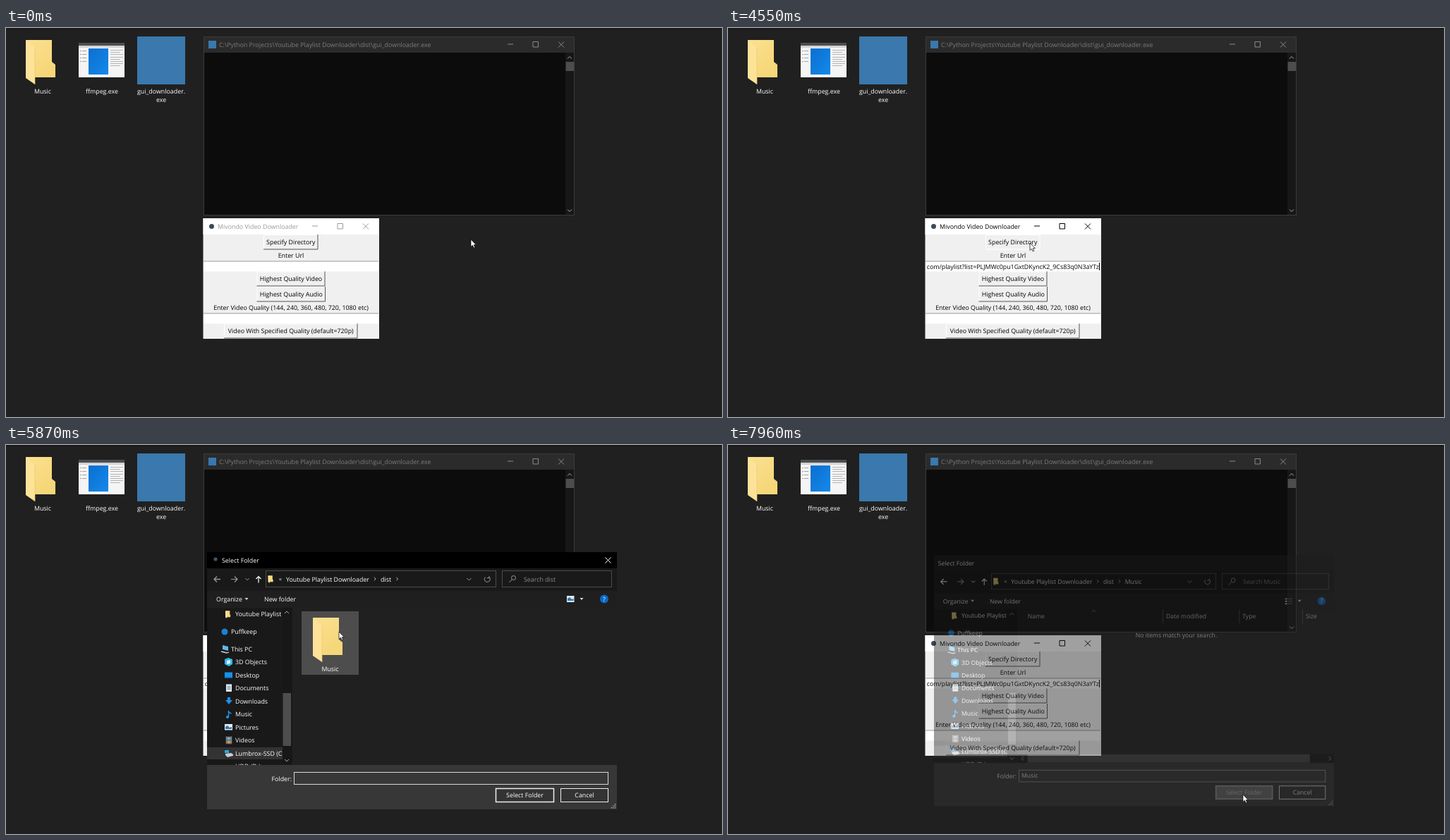
These frames come from a looping animation (1015 px wide and 552 px high, 8 s). An HTML page:

```html
<!DOCTYPE html>
<html lang="en">
<head>
<meta charset="utf-8">
<title>Playlist downloader demo</title>
<style>
html, body { margin: 0; width: 100%; height: 100%; overflow: hidden; background: #202020; }
svg { display: block; width: 100%; height: 100%; }
text { font: 8.86px "Open Sans", "Noto Sans", sans-serif; text-rendering: geometricPrecision; white-space: pre; }
</style>
</head>
<body>
<svg id="stage" viewBox="0 0 1015 552"></svg>
<script>
const LOOP = 8000;

// Markup helpers
const rect = (x, y, w, h, fill, more = '') =>
  `<rect x="${x}" y="${y}" width="${w}" height="${h}" fill="${fill}" ${more}/>`;
const frame = (x, y, w, h, fill, stroke, more = '') =>
  rect(x + .5, y + .5, w - 1, h - 1, fill, `stroke="${stroke}" ${more}`);
const text = (x, y, s, fill = '#fff', more = '') =>
  `<text x="${x}" y="${y}" fill="${fill}" ${more}>${s}</text>`;
const mid = (x, y, s, fill, more = '') => text(x, y, s, fill, `text-anchor="middle" ${more}`);
const line = (d, stroke, w = 1, more = '') =>
  `<path d="${d}" fill="none" stroke="${stroke}" stroke-width="${w}" ${more}/>`;
const shape = (d, fill, more = '') => `<path d="${d}" fill="${fill}" ${more}/>`;
const dot = (x, y, r, fill, more = '') => `<circle cx="${x}" cy="${y}" r="${r}" fill="${fill}" ${more}/>`;
const group = (id, ...parts) => `<g id="${id}">${parts.join('')}</g>`;
const folder = (x, y, k) => `<use href="#folder" transform="translate(${x} ${y}) scale(${k})"/>`;

// Chevrons: dx, dy give the direction of the point
const chevron = (x, y, dx, dy, c = '#aaa', r = 3, more = '') => {
  const h = r / 2;
  return line(dx ? `M${x - dx * h} ${y - r}L${x + dx * h} ${y}L${x - dx * h} ${y + r}`
    : `M${x - r} ${y - dy * h}L${x} ${y + dy * h}L${x + r} ${y - dy * h}`, c, 1, more);
};
const cross = (x, y, c, more = '') => line(`M${x - 4} ${y - 4}l8 8m0-8l-8 8`, c, 1, more);
const controls = (x, y, c) =>
  line(`M${x - 40} ${y - .5}h8M${x - 4} ${y - 4}h7.5v7.5h-7.5z`, c) + cross(x + 36, y, c);

const defs = `<defs>
  <linearGradient id="gold" x2=".6" y2="1"><stop stop-color="#fbe08f"/><stop offset="1" stop-color="#f5d678"/></linearGradient>
  <linearGradient id="blue" x2="1" y2="1"><stop stop-color="#0a6fd0"/><stop offset="1" stop-color="#1589ea"/></linearGradient>
  <g id="folder">${shape('M0 1H37V32L42 36V54H12L4 40Z', 'url(#gold)')}
    ${shape('M0 1L13 12V64L0 55Z', '#fde399')}${line('M13 12V64', '#ebc766', .7)}</g>
  <clipPath id="treeClip">${rect(285, 231, 107, 223)}</clipPath>
  <clipPath id="urlClip">${rect(280, 331, 248, 15)}</clipPath>
</defs>`;

const desktop = () => rect(0, 0, 1015, 552, '#202020') + rect(0, 0, 1015, 2, '#181818')
  + folder(28, 16, 1) + mid(52, 93, 'Music', '#fff')
  + rect(103, 21, 65, 49, '#f5f5f5') + rect(103, 21, 65, 4, '#4c4f52') + rect(103, 25, 65, 3, '#d4d4d4')
  + rect(117, 29, 28, 37, 'url(#blue)')
  + [32, 37, 42, 47].map(y => line(`M105 ${y}.5h2m1 0h6`, '#a4a4a4')).join('')
  + [31, 34, 37, 41, 44, 47, 50, 53].map((y, i) => line(`M148 ${y}.5h${i % 3 == 1 ? 14 : 18}`, '#b4b4b4')).join('')
  + mid(136, 93, 'ffmpeg.exe', '#fff')
  + rect(186, 12, 68, 68, '#3a78ad')
  + mid(220, 93, 'gui_downloader.', '#fff') + mid(220, 105, 'exe', '#fff');

const consoleWindow = () => frame(280, 12, 526, 254, '#0c0c0c', '#3b3b3b') + rect(281, 13, 524, 22, '#2b2b2b')
  + rect(287, 18, 11, 11, '#3a78ad')
  + text(302, 27, 'C:\\Python Projects\\Youtube Playlist Downloader\\dist\\gui_downloader.exe', '#7c7c7c')
  + controls(751, 23.5, '#8a8a8a')
  + rect(793, 35, 12, 230, '#171717') + rect(793.5, 48, 11.5, 13, '#4d4d4d')
  + chevron(799, 42, 0, -1) + chevron(799, 259, 0, 1);

const tkButton = (x, y, w, h, label, id = '') => rect(x, y, w, h, '#f0f0f0')
  + line(`M${x + .5} ${y + h - 1}V${y + .5}H${x + w - 1}`, '#fff')
  + line(`M${x} ${y + h - .5}H${x + w - .5}V${y}`, '#555', 1, id)
  + mid(x + w / 2, y + h / 2 + 3.4, label, '#000');
const entry = y => rect(280, y, 248, 14.5, '#fff') + line(`M280 ${y}H528`, '#9a9a9a');

const mainWindow = () => rect(279.5, 270, 249.5, 171, '#f0f0f0') + rect(279.5, 270, 249.5, 23, '#fff')
  + dot(291.5, 281.5, 3.5, '#3c4a5a')
  + group('mainTitle', text(300, 285, 'Mivondo Video Downloader', 'currentColor'), controls(474, 281.5, 'currentColor'))
  + tkButton(365, 293, 77.5, 21.5, 'Specify Directory', 'id="dirEdge"')
  + mid(404, 326, 'Enter Url', '#000') + entry(331)
  + text(526, 341.6, 'com/playlist?list=PLJMWc0pu1GxtDKyncK2_9Cs83q0N3aYTz', '#000',
    'id="url" text-anchor="end" clip-path="url(#urlClip)"')
  + rect(0, 333, 1, 11, '#000', 'id="caret"')
  + tkButton(355.5, 345.5, 97, 21, 'Highest Quality Video')
  + tkButton(355.5, 367, 97.5, 21.5, 'Highest Quality Audio')
  + mid(404, 400, 'Enter Video Quality (144, 240, 360, 480, 720, 1080 etc)', '#000') + entry(405)
  + tkButton(309, 419.5, 189.5, 21, 'Video With Specified Quality (default=720p)');

// Tree rows: centre y, text x, label, icon
const rows = [
  [240, 325, 'Youtube Playlist', folder(311, 235, .17)],
  [265, 319, 'Puffkeep', dot(310, 265, 4.5, '#1683d8')],
  [289.5, 319, 'This PC', shape('M307 284l8 2v6l-8-2z', '#62b8ee') + line('M305 293l8 2 3-1', '#cfd8de', 1.3)],
  [308, 325, '3D Objects', shape('M310 304l5-2 6 2v7l-5 3-6-3z', '#35b6ea') + shape('M313 306l5-1v5l-5 1z', '#d7f3fd')],
  [326.5, 325, 'Desktop', rect(310, 322.5, 11, 8, '#1792ea') + line('M310 330h11', '#0a62ac')],
  [345, 325, 'Documents', rect(312, 339.5, 8, 10.5, '#e6eef3') + line('M313.5 342.5h5m-5 2h5m-5 2h5', '#5489b0')],
  [363.5, 325, 'Downloads', shape('M314 358h4v4h3l-5 6-5-6h3z', '#1c8fe8')],
  [382, 325, 'Music', dot(314, 386, 2, '#1c98f0') + line('M315.5 386v-9q0 3 4 4', '#1c98f0', 1.4)],
  [400.5, 325, 'Pictures', rect(310, 396, 11, 8.5, '#e8f0f5') + shape('M311 403v-3l3-2 3 3 3-1v3z', '#2f78ae')],
  [419, 325, 'Videos', rect(311.5, 413.5, 9, 11, '#4d4d4d') + rect(313.5, 414.5, 5, 4, '#78a8c8')
    + rect(313.5, 419.5, 5, 4, '#c09a68') + line('M312.5 414v10m7-10v10', '#ddd', .8, 'stroke-dasharray="1 1"')],
  [437.5, 325, 'Lumbrox-SSD (C:)', rect(310, 433, 6, 4, '#2ba4ea') + shape('M311 438l8-1 3 2v2l-8 2-3-3z', '#c9cdd0')],
  [456, 325, 'HDD (D:)', '']
];
const tree = () => '<g clip-path="url(#treeClip)">' + rect(285, 429, 107, 17, '#333')
  + rows.map(([y, x, s, icon]) => icon + text(x, y + 3.2, s)).join('') + '</g>'
  + rect(392, 231, 13, 223, '#171717') + rect(392.5, 352, 11.5, 75, '#4d4d4d')
  + chevron(398, 237.5, 0, -1) + chevron(398, 447.5, 0, 1);

const button = (x, w, label, id, more) => frame(x, 487, w, 20, '#333', '#eee', `id="${id}" ${more}`)
  + mid(x + w / 2, 500, label, '#fff', `id="${id}Text"`);

const dialog = () => rect(285, 152, 581, 365, '#191919') + rect(285, 152, 581, 23, '#000', 'id="titleBar"')
  + group('titleExtras', dot(297, 162, 2.6, '#41566b'), cross(853.5, 163.5, '#fff'))
  + text(306, 167, 'Select Folder', '#fff', 'id="dialogTitle"')
  + group('body',
    group('back', line('M304 190.5h-9m4-4l-4 4 4 4', 'currentColor', 1.3), chevron(342, 190.5, 0, 1, 'currentColor', 2.5)),
    line('M319 190.5h9m-4-4l4 4-4 4', '#999', 1.2), line('M358 195.5v-9m-3.5 3.5l3.5-3.5 3.5 3.5', '#fff', 1.2),
    frame(368, 178, 327, 24, '#191919', '#4c4c4c'), folder(371.5, 185, .17),
    mid(389, 193, '«', '#ccc'), text(397, 193.8, 'Youtube Playlist Downloader'), chevron(523, 190, 1, 0, '#bbb', 2.3),
    text(531, 193.8, 'dist'), chevron(554.5, 190, 1, 0, '#bbb', 2.3, 'id="tailChevron"'), text(562.5, 193.8, 'Music', '#fff', 'id="crumb"'),
    chevron(656.5, 190.5, 0, 1, '#999'), line('M679.500 187.500a4 4 0 1 0 5.500 0m0-1.500v2.500h-3', '#999'),
    frame(703, 178, 156, 24, '#191919', '#4c4c4c'),
    line('M717 191l-3.500 4', '#999') + dot(719.5, 188.5, 3, 'none', 'stroke="#999"'), text(734, 193.8, '', '#8b8b8b', 'id="search"'),
    rect(285, 207, 581, 24, '#1f1f1f'), text(298, 222, 'Organize'), shape('M338.500 217h5l-2.500 3z', '#ddd'), text(366, 222, 'New folder'),
    group('iconView', rect(795, 214, 10.5, 9, '#dfe8ee'), shape('M796 221v-3l3-2 3 3 2.500-1v3z', '#2d78b3')),
    group('listView', line('M795 215.500h3m-3 3.500h3m-3 3.500h3', '#ccc', 2), line('M799.500 215.500h6m-6 3.500h6m-6 3.500h6', '#777')),
    shape('M813.500 217h5l-2.500 3z', '#ddd'), dot(848, 218.5, 6, '#0b68c4'), mid(848, 221.7, '?', '#fff', 'font-weight="bold"'),
    tree(), rect(406, 231, 460, 223, '#202020'),
    group('folderView', rect(419, 236, 81, 90, '#4d4d4d', 'id="tile"'), folder(435, 244, 1), mid(459.5, 321, 'Music')),
    group('emptyView', line('M617.500 231v20m111-20v20m92-20v20', '#5a5a5a'), chevron(517, 233, 0, -1, '#888'),
      text(421, 244, 'Name', '#ddd'), text(622, 244, 'Date modified', '#ddd'), text(733, 244, 'Type', '#ddd'), text(825, 244, 'Size', '#ddd'),
      mid(637, 271.5, 'No items match your search.'),
      rect(407, 441, 459, 13, '#171717'), rect(421, 441.5, 410, 12, '#4d4d4d'),
      chevron(414, 447.5, -1, 0), chevron(860, 447.5, 1, 0)))
  + rect(285, 454, 581, 63, '#373737')
  + text(405, 476.5, 'Folder:', '#fff', 'text-anchor="end"')
  + frame(408, 464, 446, 18, '#383838', '#d8d8d8', 'id="field"') + text(412, 475.3, 'Music', '#fff', 'id="picked"')
  + rect(412, 465.5, 1, 12, '#ddd', 'id="fieldCaret"')
  + button(694, 83, 'Select Folder', 'select', 'stroke-width="1.5"') + button(786, 68, 'Cancel', 'cancel', '')
  + line('M863.500 509v7M861 511.500v4.500M858.500 514v2', '#aaa', 1.4, 'stroke-dasharray="1.4 1.1"')
  + group('skeleton', rect(285, 175, 581, 279, '#fff'), rect(285, 231, 120, 223, '#0c0c0c'), rect(392.5, 262, 12.5, 183, '#fff'),
    chevron(398, 237.5, 0, -1), chevron(398, 447.5, 0, 1), rect(376, 467, 29, 13, '#fff'),
    frame(408, 464, 446, 18, '#fff', '#aaa', 'stroke-width="2"'),
    rect(694, 487, 83, 20, '#fff'), rect(786, 487, 68, 20, '#fff'), rect(854, 504, 12, 13, '#fff'));

const pointers = () => group('arrow',
    shape('M0 0V10.500L2.400 8.300L4.200 12L5.900 11.200L4.200 7.700H7.400Z', '#fff', 'stroke="#000" stroke-width=".7"'))
  + group('beam', line('M-2-5.500h4M0-5.500v11M-2 5.500h4', '#222'))
  + group('busy', dot(0, 0, 7, 'none', 'stroke="#1672c4" stroke-width="3"'),
    line('M0-7a7 7 0 0 1 7 7', '#7cc7f5', 3));

const stage = document.getElementById('stage');
stage.innerHTML = defs + desktop() + consoleWindow() + mainWindow() + group('dialog', dialog()) + group('pointer', pointers());
const el = {};
stage.querySelectorAll('[id]').forEach(e => el[e.id] = e);

// Held keys: [time, ...values]
const pointerKeys = [
  [0, 659, 300], [430, 640, 318], [507, 565, 348], [585, 492, 354], [660, 456, 346], [740, 450, 335], [970, 447, 335],
  [3780, 447, 333], [3860, 447, 331], [4010, 442, 318], [4090, 436, 312], [4170, 431, 307], [4240, 428, 305],
  [5710, 440, 291], [5790, 460, 273], [5870, 472, 265],
  [6720, 478, 267], [6800, 520, 296], [6880, 590, 352], [6950, 660, 412], [7030, 706, 452], [7110, 728, 473],
  [7180, 735, 482], [7260, 734, 489], [7340, 732, 494], [7490, 730, 496]
];
const fadeKeys = [
  [0, 0, 1], [4790, .06, .95], [4870, .33, .967], [4950, .72, .988], [5030, .92, .997], [5110, 1, 1],
  [7810, .92, .997], [7890, .7, .989], [7960, .42, .976]
];
const held = (keys, t) => keys.filter(k => k[0] <= t).pop().slice(1);
const toggled = (t, ...times) => times.filter(x => x <= t).length % 2 == 1;
const show = (name, on) => el[name].style.display = on ? '' : 'none';

function draw(t) {
  const [px, py] = held(pointerKeys, t);
  const busy = toggled(t, 6250, 6570), beam = toggled(t, 740, 4010);
  el.pointer.setAttribute('transform', `translate(${px} ${py})`);
  el.busy.setAttribute('transform', `rotate(${Math.floor(t / 77) * 40})`);
  show('busy', busy);
  show('beam', beam);
  show('arrow', !busy && !beam);

  el.mainTitle.style.color = toggled(t, 1370, 4790, 7810) ? '#000' : '#999';
  show('url', t >= 2680);
  show('caret', toggled(t, 1440, 1990, 2220, 2850, 3170, 3780, 4090, 4640, 7810));
  el.caret.setAttribute('x', t < 2680 ? 281 : 526);
  el.dirEdge.setAttribute('stroke', toggled(t, 4470, 4630) ? '#fff' : '#555');

  const [alpha, scale] = held(fadeKeys, t);
  const inside = t >= 6250, closing = t >= 7810;
  show('dialog', alpha > 0);
  el.dialog.setAttribute('opacity', alpha);
  el.dialog.setAttribute('transform', `translate(575.5 334.5) scale(${scale}) translate(-575.5 -334.5)`);
  show('skeleton', t < 4950);
  show('titleExtras', !closing);
  el.titleBar.setAttribute('fill', closing ? '#1c1c1c' : '#000');
  el.dialogTitle.setAttribute('x', closing ? 291 : 306);
  show('tailChevron', t >= 5330);
  show('fieldCaret', toggled(t, 4950, 5480));
  for (const id of ['crumb', 'listView', 'emptyView']) show(id, inside);
  for (const id of ['iconView', 'folderView']) show(id, !inside);
  el.search.textContent = inside ? 'Search Music' : 'Search dist';
  el.back.style.color = inside ? '#fff' : '#999';
  el.tile.setAttribute('fill', t >= 6100 ? '#707070' : '#4d4d4d');
  el.field.setAttribute('stroke', inside ? '#999' : '#d8d8d8');
  show('picked', t >= 6100);
  el.select.setAttribute('fill', t >= 7490 ? '#707070' : t >= 7260 ? '#555' : '#333');
  el.select.setAttribute('stroke', closing ? '#aaa' : '#eee');
  el.selectText.setAttribute('fill', t >= 7580 ? '#ccc' : '#fff');
}

function tick() {
  draw(performance.now() % LOOP);
  requestAnimationFrame(tick);
}
tick();
</script>
</body>
</html>
```
